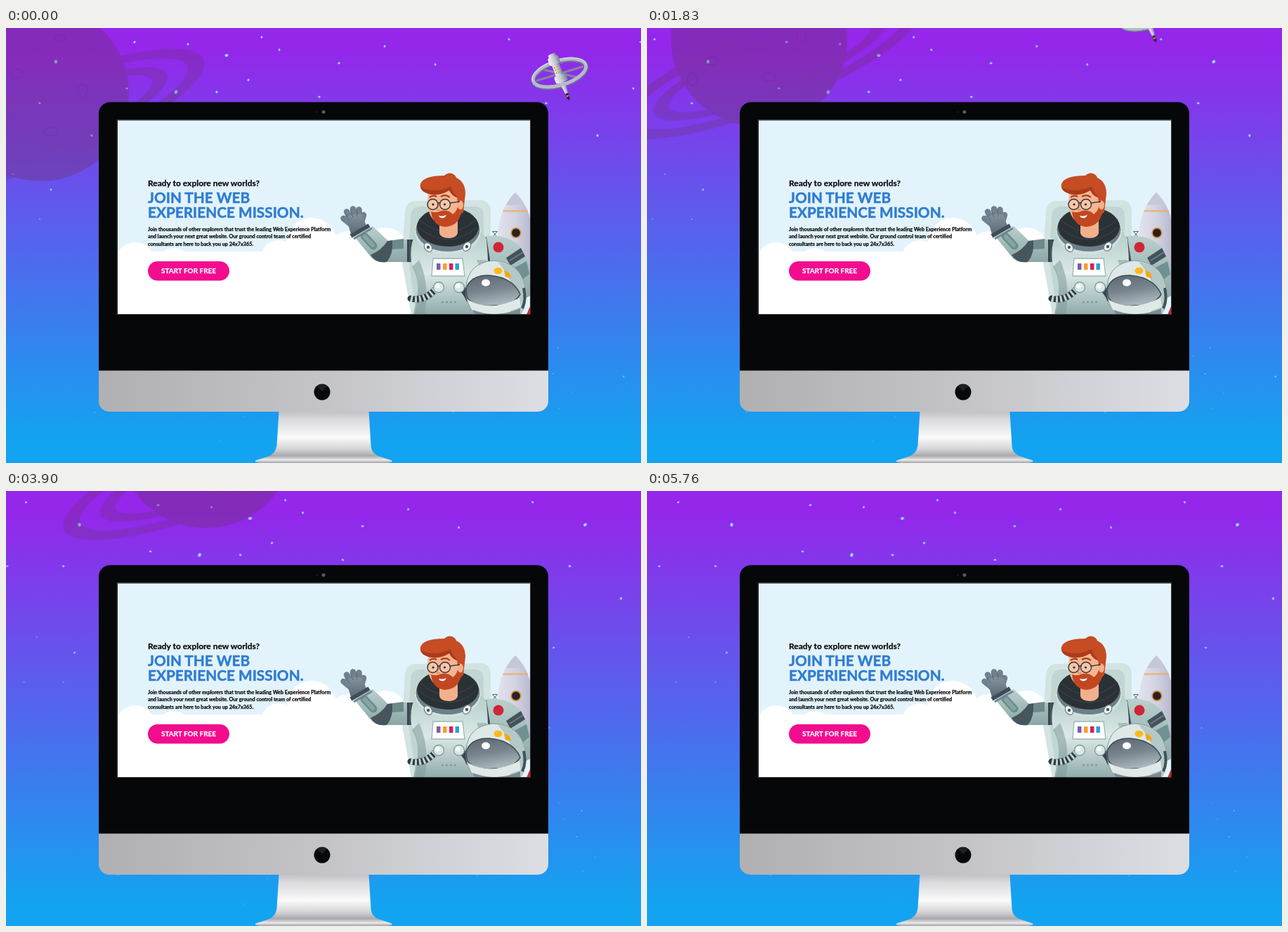
Recreate the animation shown at these times as an HTML page. Size 904x619 px, loop 5820 ms.

```html
<!DOCTYPE html>
<html lang="en">
<head>
<meta charset="utf-8">
<title>Web experience mission</title>
<style>
html, body { margin: 0; width: 100%; height: 100%; overflow: hidden; background: #7a45e8; }
svg { display: block; width: 904px; height: 619px; }
text { font-family: Lato, "Open Sans", sans-serif; font-weight: 700; stroke-width: .25; }
.title { font-size: 20.8px; stroke-width: .5; }
#stars, #planet { animation: drift 5820ms steps(194) infinite; }
#stars { --dx: 50px; --dy: 0px; }
#planet { --dx: 351px; --dy: -247px; }
#station { animation: fly 5820ms infinite; }
@keyframes drift {
  from { transform: translate(0, 0); }
  to { transform: translate(var(--dx), var(--dy)); }
}
@keyframes fly {
  0% { transform: translate(788px, 64px); animation-timing-function: steps(34); }
  17.526% { transform: translate(389.3px, 23.8px); animation-timing-function: steps(46); }
  41.237%, 100% { transform: translate(937px, -48px); }
}
</style>
</head>
<body>
<svg viewBox="0 0 904 619" xmlns="http://www.w3.org/2000/svg">
<defs>
  <linearGradient id="space" gradientUnits="userSpaceOnUse" x1="0" y1="30" x2="0" y2="590">
    <stop stop-color="#9427ea"/><stop offset="1" stop-color="#12a4f0"/>
  </linearGradient>
  <linearGradient id="chin">
    <stop stop-color="#b0b0b3"/><stop offset=".5" stop-color="#c4c4c8"/><stop offset="1" stop-color="#dcdee3"/>
  </linearGradient>
  <linearGradient id="stand" x2="0" y2="1">
    <stop stop-color="#c2c2c6"/><stop offset=".15" stop-color="#dadadd"/><stop offset=".5" stop-color="#fafafa"/>
    <stop offset=".72" stop-color="#d6d6d9"/><stop offset=".86" stop-color="#a9a9ad"/>
    <stop offset=".94" stop-color="#e9e9eb"/><stop offset="1" stop-color="#a2a2a6"/>
  </linearGradient>
  <linearGradient id="suit" x1="0" y1="0" x2="0" y2="1">
    <stop stop-color="#b4cdca"/><stop offset=".5" stop-color="#dbe9e7"/><stop offset="1" stop-color="#8fabaa"/>
  </linearGradient>
  <linearGradient id="sleeve" x2="0" y2="1">
    <stop stop-color="#b9d0cd"/><stop offset="1" stop-color="#8aa7a6"/>
  </linearGradient>
  <linearGradient id="hull">
    <stop stop-color="#e2e2ee"/><stop offset=".5" stop-color="#d2d2e2"/><stop offset="1" stop-color="#b4b6cc"/>
  </linearGradient>
  <linearGradient id="visor" x2=".3" y2="1">
    <stop stop-color="#5a666f"/><stop offset=".55" stop-color="#78858e"/><stop offset="1" stop-color="#a7b4ba"/>
  </linearGradient>
  <linearGradient id="glove" x2="0" y2="1">
    <stop stop-color="#84929e"/><stop offset="1" stop-color="#5c6a77"/>
  </linearGradient>
  <linearGradient id="metal">
    <stop stop-color="#f2f2f7"/><stop offset=".55" stop-color="#c3c6d4"/><stop offset="1" stop-color="#7b7f95"/>
  </linearGradient>
  <clipPath id="screen"><rect x="159" y="131.500" width="587" height="275.500"/></clipPath>
  <clipPath id="front"><rect x="-250" y="0" width="500" height="80"/></clipPath>
  <mask id="outside" maskUnits="userSpaceOnUse" x="-300" y="-300" width="600" height="600">
    <rect x="-300" y="-300" width="600" height="600" fill="#fff"/><circle r="125.500"/>
  </mask>
  <path id="rings" transform="translate(15 40) rotate(-22)" fill-rule="evenodd"
    d="M-234 0a234 58 0 1 0 468 0a234 58 0 1 0-468 0z
    M-209 0a209 47 0 1 0 418 0a209 47 0 1 0-418 0z
    M-178 0a178 41 0 1 0 356 0a178 41 0 1 0-356 0z
    M-155 0a155 32 0 1 0 310 0a155 32 0 1 0-310 0z"/>
</defs>

<rect width="904" height="619" fill="url(#space)"/>
<g id="stars" fill="#93d9f2"></g>

<g id="planet"><g transform="translate(49.300 92.500)" fill="#6e3270">
  <g mask="url(#outside)"><use href="#rings" fill-opacity=".27"/></g>
  <circle r="125.500" fill-opacity=".38"/>
  <g fill="none" stroke="#5c2a8c" stroke-opacity=".3">
    <ellipse cx="-67" cy="32" rx="9" ry="6"/><ellipse cx="-95" cy="58" rx="7" ry="9"/>
    <ellipse cx="14" cy="55" rx="10" ry="6"/><ellipse cx="-34" cy="-28" rx="9" ry="6"/>
    <ellipse cx="60" cy="-4" rx="7" ry="9"/><ellipse cx="28" cy="-78" rx="7" ry="5"/>
  </g>
  <g clip-path="url(#front)"><use href="#rings" fill-opacity=".08"/></g>
</g></g>

<g id="station">
  <g transform="rotate(-17)" fill="none">
    <path d="M-35 1H35M-22-12L22 13" stroke="#8388a0" stroke-width="3"/>
    <ellipse cy="1" rx="39" ry="17" stroke="#717690" stroke-width="6.500"/>
    <ellipse rx="39" ry="17" stroke="#b5bace" stroke-width="4.500"/>
    <ellipse cy="-1" rx="40" ry="18" stroke="#dfe2ec" stroke-width="1.200"/>
  </g>
  <g transform="translate(-1 0) rotate(-21)">
    <rect x="-5.500" y="-29" width="11" height="6" rx="2.500" fill="url(#metal)"/>
    <rect x="-8" y="-25" width="16" height="12" rx="3" fill="url(#metal)"/>
    <rect x="-5.500" y="-13" width="11" height="18" fill="url(#metal)"/>
    <path d="M-3-10v12M1-10v12" stroke="#d89b3c" stroke-width="2" stroke-dasharray="2 2"/>
    <rect x="-9" y="3" width="18" height="11" rx="3" fill="url(#metal)"/>
    <path d="M-4 14h8l-2 18h-4z" fill="url(#metal)"/>
    <path d="M-2 31h4v7l-2 4-2-4z" fill="#2c2433"/><path d="M-1.500 35h3" stroke="#eda13b" stroke-width="2"/>
  </g>
  <path d="M-39 0A39 17 0 0 0 39 0" transform="rotate(-17)" fill="none" stroke="#b5bace" stroke-width="4.500"/>
</g>

<!-- monitor -->
<path d="M388.500 546L385.500 594Q384 606 372 610L355 615.500V617.500L362 619H543L549.500 617.500V615.500L533 610Q520 606 519.500 594L516.500 546Z" fill="url(#stand)"/>
<path d="M132 488V121.500a16 16 0 0 1 16-16H756a16 16 0 0 1 16 16V488Z" fill="#060708"/>
<path d="M132 487.500H772V531a15 15 0 0 1-15 15H147a15 15 0 0 1-15-15Z" fill="url(#chin)"/>
<rect x="158" y="130.500" width="588.500" height="277" fill="none" stroke="#3a3c3f"/>
<circle cx="452" cy="119.500" r="2.500" fill="#565a60"/><circle cx="442.500" cy="119.500" r=".7" fill="#444"/>
<circle cx="450" cy="518" r="11.500" fill="#08090a"/>
<path d="M450 517L443 509.500A11 11 0 0 1 457 509.500Z" fill="#1e2123"/>

<g clip-path="url(#screen)">
  <rect x="158" y="131" width="589" height="277" fill="#e3f3fc"/>
  <g fill="#fff">
    <rect x="158" y="318" width="430" height="90"/>
    <circle cx="184" cy="333" r="28"/><circle cx="239" cy="337" r="24"/>
    <circle cx="388" cy="327" r="25"/><circle cx="435" cy="306" r="36"/>
    <circle cx="488" cy="320" r="31"/><circle cx="540" cy="315" r="31"/><circle cx="572" cy="330" r="26"/>
  </g>

  <g fill="#0b0b0d" stroke="#0b0b0d">
    <text x="202" y="224.500" font-size="12">Ready to explore new worlds?</text>
    <g fill="#2f7dd1" stroke="#2f7dd1">
      <text class="title" x="202" y="248.500">JOIN THE WEB</text>
      <text class="title" x="202" y="269.500">EXPERIENCE MISSION.</text>
    </g>
    <g font-size="7.300" letter-spacing="-.03">
      <text x="202" y="288.500">Join thousands of other explorers that trust the leading Web Experience Platform</text>
      <text x="202" y="299">and launch your next great website. Our ground control team of certified</text>
      <text x="202" y="310">consultants are here to back you up 24x7x365.</text>
    </g>
  </g>
  <rect x="202" y="332" width="116" height="27.500" rx="13.750" fill="#f20d8e"/>
  <text x="260" y="349.300" font-size="10" fill="#fff" stroke="#fff" text-anchor="middle">START FOR FREE</text>

  <!-- rocket -->
  <path d="M725 234C708 250 700 275 700 300V345H750V300C750 275 742 250 725 234Z" fill="url(#hull)"/>
  <path d="M725 234C719 240 715 246 712 252H738C735 246 731 240 725 234Z" fill="#c6c7da"/>
  <path d="M707.500 260.500H743" stroke="#eeb063" stroke-width="2"/>
  <circle cx="726" cy="291.500" r="6.800" fill="#2a2025" stroke="#d99545" stroke-width="1.800"/>
  <path d="M692.500 289.500h7l-7 8h7l-7-8M692 297.500h8" fill="none" stroke="#4d5055" stroke-width=".9"/>

  <!-- backpack -->
  <path d="M584 246Q569 246 568 262L564 320Q563 335 567 350L577 408H690V262Q690 245 674 245Z" fill="#d2e3e1"/>
  <path d="M590 254Q577 254 576 268L573 330L584 408H680V268Q680 254 668 254Z" fill="#c1d6d3"/>

  <!-- waving arm -->
  <path d="M496 297L522 282L545 304Q562 299 584 302V333H541Q526 335 518 324Z" fill="url(#sleeve)"/>
  <path d="M519 323Q535 316 543 303L550 302Q552 321 542 333Q526 335 519 323Z" fill="#46555e"/>
  <path d="M510 296L523 310" stroke="#6c8e8d" stroke-width="11" stroke-linecap="round"/>
  <path d="M511 297L522 309" stroke="#84a5a2" stroke-width="6" stroke-linecap="round"/>
  <path d="M550 302L566 300V314L550 315Z" fill="#6c8a8a"/>
  <path d="M571 301H585V333H571Z" fill="#39474f"/>
  <path d="M575 301V333M580 301V333" stroke="#5a6a72"/>
  <g stroke="#71808c" stroke-width="8.500" stroke-linecap="round">
    <path d="M494 282L480.500 271M495 280L485 261.500M499 278L494 257.500M503 278L502.500 258.500M505 280L509 266"/>
  </g>
  <path d="M484 270Q494 262 507 266L513 281L491 293Z" fill="url(#glove)"/>
  <path d="M489 274L483.500 265M494 269L490 259M500 268L499 259" stroke="#53616d" stroke-width=".9"/>
  <path d="M491 296L517 281" stroke="#3f4d58" stroke-width="6"/>
  <path d="M495 300L521 285" stroke="#74848d" stroke-width="3"/>

  <!-- far arm -->
  <path d="M676 297Q715 291 733 313Q750 336 748 380L730 390L700 345L678 336Z" fill="url(#sleeve)"/>
  <path d="M676 300L684 298L690 336L678 338Z" fill="#3b4951"/>
  <path d="M712 327L733 313L739 325L718 338Z" fill="#44535b"/>
  <path d="M717 331L736 319" stroke="#6c7c83" stroke-width="2"/>
  <path d="M722 342L741 332L745 350L733 360Z" fill="#6f9190"/>
  <circle cx="701" cy="312" r="7.500" fill="#cf2637"/>

  <!-- torso -->
  <path d="M584 292Q574 306 577 334Q590 350 585 380L580 408H680Q690 360 684 300L676 290Z" fill="url(#suit)"/>
  <path d="M578 340Q592 360 582 408H596Q604 365 588 330Z" fill="#7f9c9b" opacity=".55"/>
  <path d="M670 330Q686 365 672 408H684V330Z" fill="#7f9c9b" opacity=".5"/>
  <ellipse cx="629" cy="289" rx="47" ry="34" fill="#cfe0de"/>
  <ellipse cx="629" cy="287" rx="45.500" ry="31" fill="#6e7f86"/>
  <ellipse cx="629" cy="283" rx="44" ry="28" fill="#2b3236"/>
  <path d="M590 274Q629 306 668 274M588 284Q629 318 670 284" fill="none" stroke="#3d464b"/>
  <g fill="#eef5f4" stroke="#6d8085" stroke-width="1.200">
    <ellipse cx="601" cy="312" rx="5" ry="7" transform="rotate(-35 601 312)"/>
    <ellipse cx="656" cy="311" rx="5" ry="7" transform="rotate(35 656 311)"/>
  </g>
  <circle cx="601" cy="312" r="2.200" fill="#46555c"/><circle cx="656" cy="311" r="2.200" fill="#46555c"/>
  <path d="M608 328H650L653 353H606Z" fill="#fff" stroke="#9db5b3" stroke-width="1.300"/>
  <path d="M613 335h5.500v9h-5.500z" fill="#7a5ea6"/><path d="M622 335h5.500v9h-5.500z" fill="#fb9c2c"/>
  <path d="M631 335h5.500v9h-5.500z" fill="#d4205c"/><path d="M639.500 335h5.500v9h-5.500z" fill="#2ba0dc"/>
  <g fill="none" stroke-width="9">
    <path d="M576 385Q596 390 613 370" stroke="#2e3a41" stroke-linecap="round"/>
    <path d="M576 385Q596 390 613 370" stroke="#c2d4d2" stroke-dasharray="3 3"/>
    <path d="M649 371Q656 377 660 388" stroke="#37454c"/>
  </g>
  <g fill="#d8e7e5" stroke="#819d9c" stroke-width="1.300">
    <circle cx="616" cy="369" r="7.500"/><circle cx="645" cy="369" r="7.500"/>
  </g>
  <circle cx="614.500" cy="367" r="3.500" fill="#f4faf9"/><circle cx="643.500" cy="367" r="3.500" fill="#f4faf9"/>
  <path d="M621.500 390H641" stroke="#7f9a99" stroke-width="3" stroke-linecap="round" stroke-dasharray="0 6"/>

  <!-- head -->
  <path d="M617 268H643V292Q641 299 630 299Q619 299 617 292Z" fill="#f3b08c"/>
  <path d="M617 275Q632 288 643 270V266H617Z" fill="#dc8f6c"/>
  <path d="M601 232Q599 252 603 264Q610 280 624 280Q645 278 651 256L652 230Z" fill="#f7b691"/>
  <path d="M590 222Q594 210 624 210Q629 205 635 207Q640 209 641 213Q654 219 654 236L651 262Q647 266 645 262L642 241Q635 239 631 231Q614 241 599 235Q588 231 590 222Z" fill="#c64c24"/>
  <path d="M591 227Q612 236 633 225Q636 235 643 240L642 241Q635 239 631 231Q614 241 599 235Q592 232 591 227Z" fill="#aa3c1b"/>
  <path d="M605 261Q612 264 620 260Q631 259 636 265Q641 262 643 255L648 257Q648 281 625 283Q607 281 605 261Z" fill="#c24720"/>
  <path d="M616 267Q621 269 627 266Q625 270.500 621 270.500Q617 270 616 267Z" fill="#fff"/>
  <ellipse cx="647" cy="252" rx="4" ry="6.500" fill="#f3b08c"/>
  <path d="M603 241Q608 237 613 240M619 240Q626 236 632 241" fill="none" stroke="#a93c1a" stroke-width="2.200"/>
  <path d="M616 251L613.500 259H618" fill="none" stroke="#dc8f6c" stroke-width="1.300"/>
  <g fill="#fff" fill-opacity=".2" stroke="#30343a" stroke-width="1.400">
    <circle cx="607.500" cy="251" r="7.500"/><circle cx="625" cy="251" r="7.500"/>
    <path d="M615 249.500Q616.500 248 618 249.500M632.500 249L646 247" fill="none"/>
  </g>
  <circle cx="608" cy="251" r="1.600" fill="#2d2523"/><circle cx="624.500" cy="251" r="1.600" fill="#2d2523"/>

  <!-- helmet -->
  <path d="M655 368Q658 334 694 331Q734 333 739 372Q742 395 732 408H668Q653 392 655 368Z" fill="#dde8e7" stroke="#7f9897"/>
  <path d="M700 333Q734 336 739 372Q742 395 732 408H716Q734 370 700 333Z" fill="#b4c8c7"/>
  <path d="M656 368Q664 351 688 352Q722 355 732 379Q722 396 694 395Q666 398 657 384Q654 375 656 368Z" fill="url(#visor)" stroke="#3f4c54" stroke-width="1.500"/>
  <path d="M658 387Q690 405 731 384L733 397Q698 412 664 399Z" fill="#dfe9e8"/>
  <path d="M664 401Q698 414 732 399V408H668Z" fill="#7b8b91"/>
  <ellipse cx="683" cy="362.500" rx="6" ry="5" fill="#fff"/>
  <ellipse cx="700.500" cy="345.500" rx="6" ry="4.800" fill="#fdb91d"/>
  <path d="M709 345Q718 346 719 356L711 354Z" fill="#f3a712"/>
  <path d="M737 370Q741 387 735 399" fill="none" stroke="#43525a" stroke-width="4"/>
  <path d="M746 396V408H741Z" fill="#cf2637"/>
</g>
</svg>
<script>
// x, y, radius
const stars = [
  -32,107,1.7, -5,16,1.7, -8,272,1, 10,208,1.1, 48,107,1.7, 48,272,1.1, 64,230,1.6, 71,48,2.7,
  122,153,1.8, 172,86,1.7, 183,20,1.8, 242,91,2.7, 259,23,1.7, 300,91,1.8, 314,39,2.6, 345,74,1.8,
  364,13,1.7, 389,31,1.7, 446,98,1.8, 474,50,1.8, 539,26,1.7, 611,52,1.7, 716,16,1.7, 769,107,1.8,
  791,48,2.6, 842,153,1.9, 893,86,1.7, 903,20,1.5, 746,223,1.6, 740,337,1, 754,444,.8, 761,467,.8,
  786,455,1.1, 779,492,1.1, 805,520,.8, 788,541,.8, 879,496,1.4, 126,547,.9, 305,588,.7, 338,553,.8,
  637,547,1
];
const layer = document.getElementById("stars");
for (let i = 0; i < stars.length; i += 3) {
  const [x, y, r] = stars.slice(i, i + 3);
  const star = document.createElementNS(layer.namespaceURI, "ellipse");
  const attrs = { rx: r, ry: r * 0.8, opacity: Math.min(1, 0.2 + r * 0.45),
    transform: `translate(${x} ${y}) rotate(${i * 47})` };
  for (const name in attrs) star.setAttribute(name, attrs[name]);
  layer.append(star);
}
</script>
</body>
</html>
```
